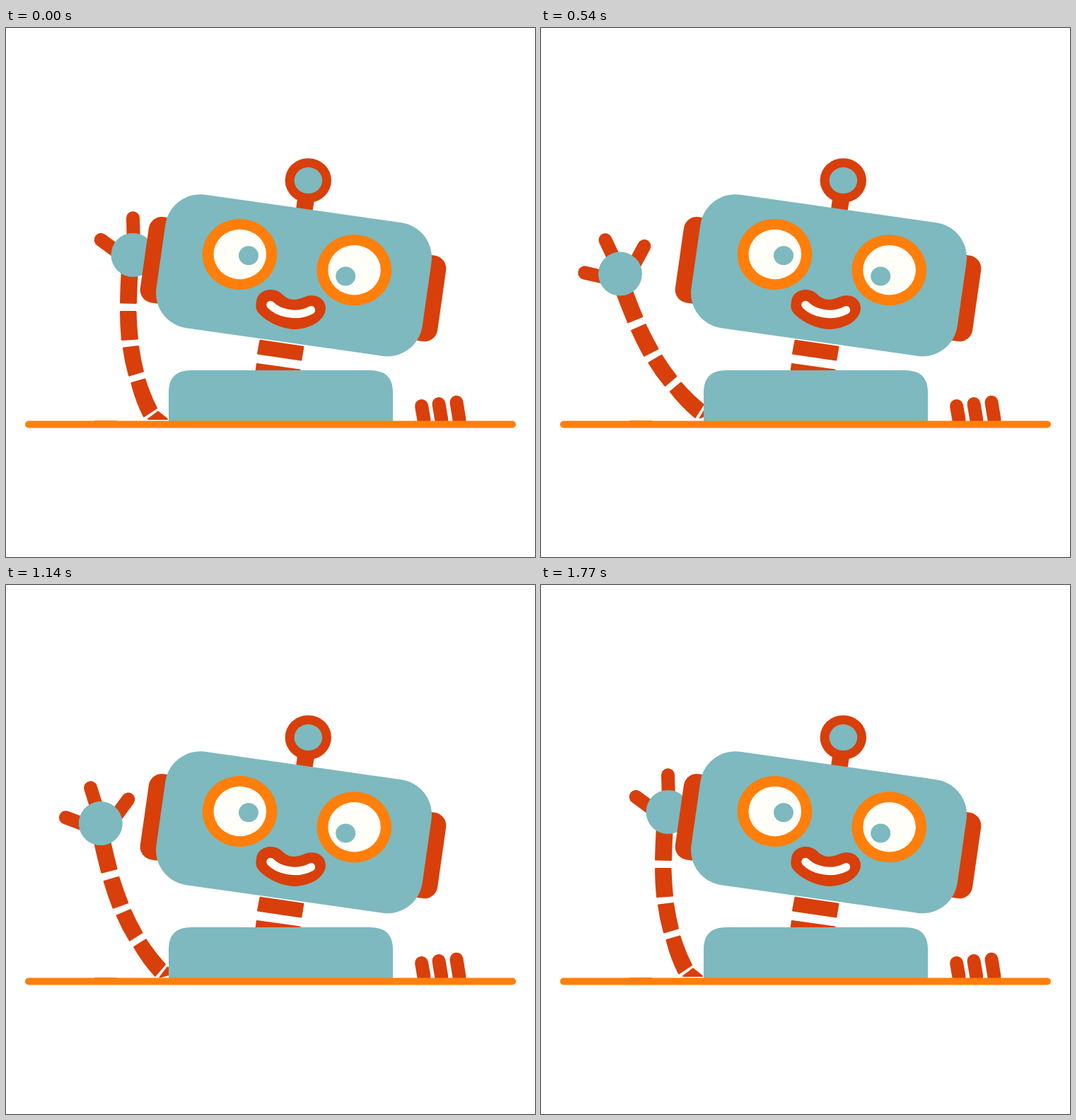
These frames come from a looping animation (748 px wide and 748 px high, 1800 ms). An HTML page:

```html
<!DOCTYPE html>
<html lang="en">
<head>
<meta charset="utf-8">
<title>Waving robot</title>
<style>
  html, body { margin: 0; width: 100%; height: 100%; overflow: hidden; background: #fff; }
  svg { display: block; width: 100vw; height: 100vh; }
  .teal { fill: #7db9be; }
  .red { fill: #d83f0a; }
  .orange { fill: #ff7f0a; }
  .white { fill: #fffef8; }
  .finger { fill: none; stroke: #d83f0a; stroke-width: 19; stroke-linecap: round; }
  .plate { fill: #d83f0a; stroke: #d83f0a; stroke-width: 2; stroke-linejoin: round; }
</style>
</head>
<body>
<svg viewBox="0 0 748 748">
  <g id="arm">
    <g class="plate">
      <path d="M164 340 Q162.5 365 162 388.5 L184 389 Q184.500 365 186 340 Z"/>
      <path d="M162 401 L183.500 401 Q184 421 186 439.500 L164 441 Q162 421 162 401 Z"/>
      <path d="M166 452.500 L187 450 Q189.500 468 194 485.500 L174 491.500 Q168.500 472 166 452.500 Z"/>
      <path d="M177.500 502 L196.500 496.500 Q203 518 213 537.500 L195 549.500 Q183.500 527 177.500 502 Z"/>
      <path d="M201 553 L215 542.500 L228 553 Z"/>
    </g>
    <path class="finger" d="M179.500 268.700 L180.500 305 M134.200 299.500 L160 318.500 M226.300 298.800 L203 317"/>
    <circle class="teal" cx="179.500" cy="321" r="31"/>
  </g>

  <path class="plate" d="M359.500 441.700 L420.500 450.800 L417.300 469.500 L356 460.500 Z M354.800 475 L415.500 483.500 V490 H353 Z"/>
  <path class="teal" d="M230 558 V515 Q230 484 262 484 H515 Q547 484 547 515 V558 Z"/>

  <path class="red" d="M409.500 260 L412.500 238 L437 240 Q434.500 250 433 263 Z"/>
  <ellipse class="red" cx="427.300" cy="215.500" rx="32.700" ry="31.300"/>
  <ellipse class="teal" cx="427.400" cy="215.600" rx="19.800" ry="18.500"/>

  <g transform="translate(407 350) rotate(8.100)">
    <rect class="red" x="-212.500" y="-56" width="80" height="122.500" rx="18.500"/>
    <rect class="red" x="132" y="-56" width="80" height="122.500" rx="18.500"/>
    <rect class="teal" x="-190" y="-95.500" width="380" height="190.500" rx="50"/>
  </g>

  <g id="eyes"></g>

  <path class="red" d="M354 387 C355 372 373 366 386 373 C391 376 396 384 407 384 C418 384 421 378.500 432 378.300 C447 378 455 391 451 402 C446 417 426 426 407 426 C386 425 363 412 355 400 C353 396 353 392 354 387 Z"/>
  <path d="M374 391.500 C384 402 409 410.500 431.500 398.800" fill="none" stroke="#fffef8" stroke-width="11.500" stroke-linecap="round"/>

  <path class="finger" d="M587.600 534.500 L591 554 M612 531.500 L615.800 554 M637 529.200 L641 554"/>
  <rect class="orange" x="125" y="555" width="32" height="3"/>
  <rect class="orange" x="27" y="555.500" width="694" height="10" rx="5"/>
</svg>
<script>
  const STEP = 30, LOOP = 1800;
  const SWING = 15.56, TWIST = 14.04;
  // [time, how far the arm leans outward]
  const KEYS = [[0, 0], [450, 1], [900, 0], [1350, 1], [1770, 0], [1800, 0]];

  const ellipse = (cls, cx, cy, rx, ry) =>
    `<ellipse class="${cls}" cx="${cx}" cy="${cy}" rx="${rx}" ry="${ry}"/>`;
  const eye = (x, y, px, py) =>
    ellipse('orange', x, y, 52.8, 50) +
    ellipse('white', x + 0.3, y, 37.3, 35.2) +
    ellipse('teal', px, py, 14, 13.5);

  document.getElementById('eyes').innerHTML =
    eye(330.5, 320, 343, 321.7) + eye(492.3, 342.3, 480.2, 351);

  const arm = document.getElementById('arm');

  function lean(t) {
    const i = KEYS.findIndex(k => k[0] > t);
    const [t0, a] = KEYS[i - 1], [t1, b] = KEYS[i];
    return a + (b - a) * (t - t0) / (t1 - t0);
  }

  function draw(now) {
    const t = Math.floor((now % LOOP) / STEP) * STEP;
    const u = lean(t);
    arm.setAttribute('transform',
      `rotate(${-SWING * u} 267.7 644) rotate(${-TWIST * u} 179.5 321)`);
  }

  let start;
  function tick(now) {
    start ??= now;
    draw(now - start);
    requestAnimationFrame(tick);
  }
  draw(0);
  requestAnimationFrame(tick);
</script>
</body>
</html>
```
